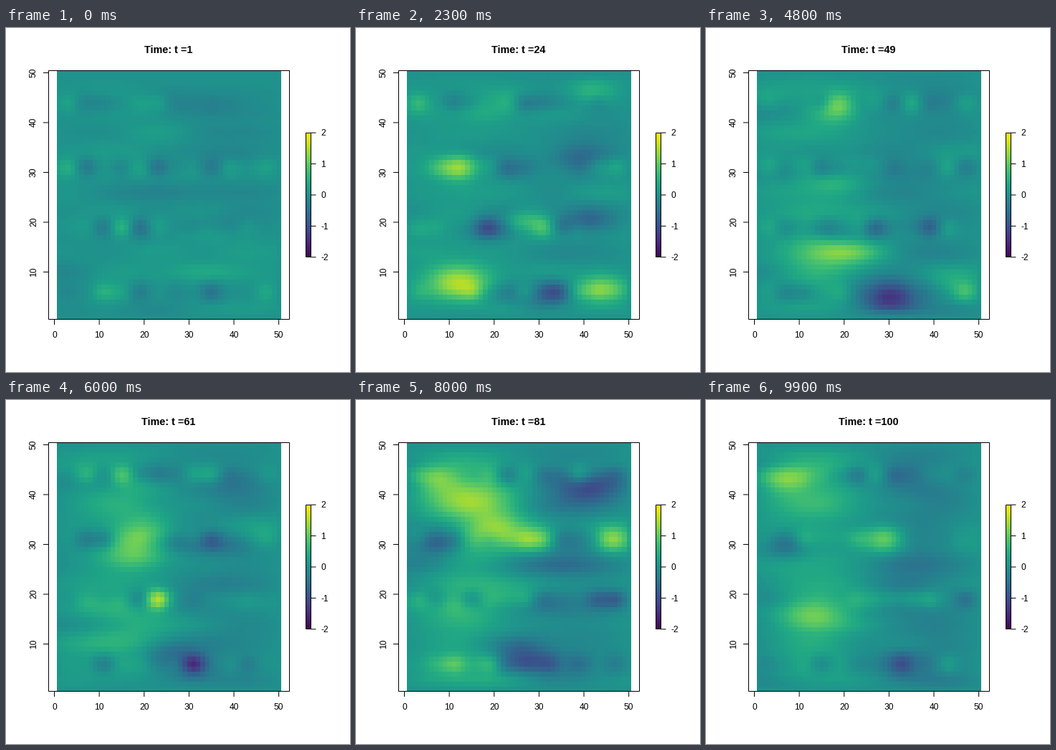
Recreate the animation shown at these times as a matplotlib script. Size 480 px wide and 480 px high, loop 10 s.

```python
import numpy as np
import matplotlib.pyplot as plt
from matplotlib.animation import FuncAnimation
from matplotlib.patches import Rectangle

plt.rcParams["font.family"] = "Liberation Sans"

STEPS, SIZE, N = 100, 480, 50
PT = 72 / 80  # points per pixel at 80 dpi
ROWS = np.array([6, 19, 31, 44])  # the field is disturbed along these rows
LIFE = 11
X, Y = np.meshgrid(np.arange(1, N + 1), np.arange(1, N + 1))
RIM = np.clip(np.minimum(np.minimum(Y, N + 1 - Y) / 3, (N + 2 - X) / 3), 0, 1)

# Main highs and lows: peak time, x, y, height
PEAKS = [
    (12, 39, 33, -1.0), (14, 41, 20, -1.2), (18, 33, 6, -0.8), (22, 42, 46, 0.8),
    (23, 27, 20, 1.0), (24, 12, 31, 1.3), (27, 12, 8, 1.4), (34, 18, 19, -1.1),
    (34, 44, 7, 1.4), (42, 18, 43, 1.3), (42, 30, 5, -1.7), (48, 17, 14, 0.8),
    (60, 18, 28, 0.8), (70, 23, 19, 0.8), (72, 26, 8, -0.9), (73, 20, 33, 1.4),
    (80, 41, 41, -0.8), (81, 46, 31, 1.4), (82, 15, 39, 1.1), (91, 7, 43, 1.2),
    (92, 7, 30, -1.1), (93, 29, 31, 1.5), (96, 13, 16, 0.8), (97, 33, 6, -1.1),
]


def bump(x, y, sx, sy):
    return np.exp(-((X - x) / sx) ** 2 / 2 - ((Y - y) / sy) ** 2 / 2)


def peak_shape(x, y, amp):
    """Compact on a source row, spread out sideways between rows."""
    away = np.abs(ROWS - y).min()
    return amp * bump(x, y, 1.4 + 1.2 * abs(amp) + 0.9 * away,
                      1 + 0.6 * abs(amp) + 0.25 * away)


def noise_steps(shapes, sd, rho=0.9, seed=4):
    """Slowly changing random weights on a set of shapes."""
    rng = np.random.default_rng(seed)
    amps = rng.normal(0, sd, len(shapes))
    for _ in range(STEPS):
        yield np.tensordot(amps, shapes, 1)
        amps = rho * amps + rng.normal(0, sd * np.sqrt(1 - rho ** 2), len(amps))


def bumps(rows, step, sx, sy):
    return np.array([bump(x, y, sx, sy) for y in rows for x in range(3, N, step)])


peaks = [(t, peak_shape(x, y, amp)) for t, x, y, amp in PEAKS]
fine = list(noise_steps(bumps(ROWS, 4, 1.8, 1.4), 0.27))
broad = list(noise_steps(bumps(range(2, N, 4), 10, 6, 1.4), 0.13, seed=9))
tilt = np.sin(2 * np.pi * X / N)


def state(t):
    grow = 1 - np.exp(-t / 6)
    main = sum(np.exp(-((t - t0) / LIFE) ** 2 / 2) * s for t0, s in peaks)
    lean = 0.3 * t / STEPS * tilt
    return RIM * (0.06 + grow * main + lean + fine[t - 1] + broad[t - 1])


fig = plt.figure(figsize=(SIZE / 80, SIZE / 80), dpi=80, facecolor="white")
ax = fig.add_axes([0, 0, 1, 1])


def line(xs, ys):
    ax.plot(xs, ys, color="black", lw=PT, solid_capstyle="butt", snap=False, zorder=3)


def frame(x0, y0, x1, y1):
    ax.add_patch(Rectangle((x0, y0), x1 - x0, y1 - y0, fill=False,
                           ec="black", lw=PT, snap=False, zorder=3))


def label(x, y, s, size=12, **kw):
    return ax.text(x, y, s, fontsize=size * PT, va="baseline",
                   rotation_mode="anchor", **kw)


style = dict(cmap="viridis", vmin=-2, vmax=2, interpolation="nearest", aspect="auto")
image = ax.imshow(state(1), origin="lower", extent=(71, 384, 407, 59), **style)
ax.imshow(np.linspace(2, -2, 64)[:, None], extent=(418, 425, 320, 146), **style)
frame(59.5, 59.5, 395.5, 406.5)
frame(418.5, 146.5, 425.5, 319.5)

for v in range(0, 51, 10):
    x = 67.5 + 6.263 * v
    line([x, x], [406.5, 414])
    label(x, 432, str(v), ha="center")
for v in range(10, 51, 10):
    y = 410 - 6.95 * v
    line([52, 59.5], [y, y])
    label(42, y - 0.5, str(v), ha="center", rotation=90)
for v in range(-2, 3):
    y = 233 - 43.4 * v
    line([425.5, 432.5], [y, y])
    label(439, y + 4.3, str(v), ha="left")

title = label(227, 35, "", 14.4, ha="center", weight="bold")
ax.set(xlim=(0, SIZE), ylim=(SIZE, 0))
ax.axis("off")


def update(n):
    image.set_data(state(n + 1))
    title.set_text(f"Time: t ={n + 1}")
    return image, title


anim = FuncAnimation(fig, update, frames=STEPS, interval=100, repeat=True)
plt.show()
```
